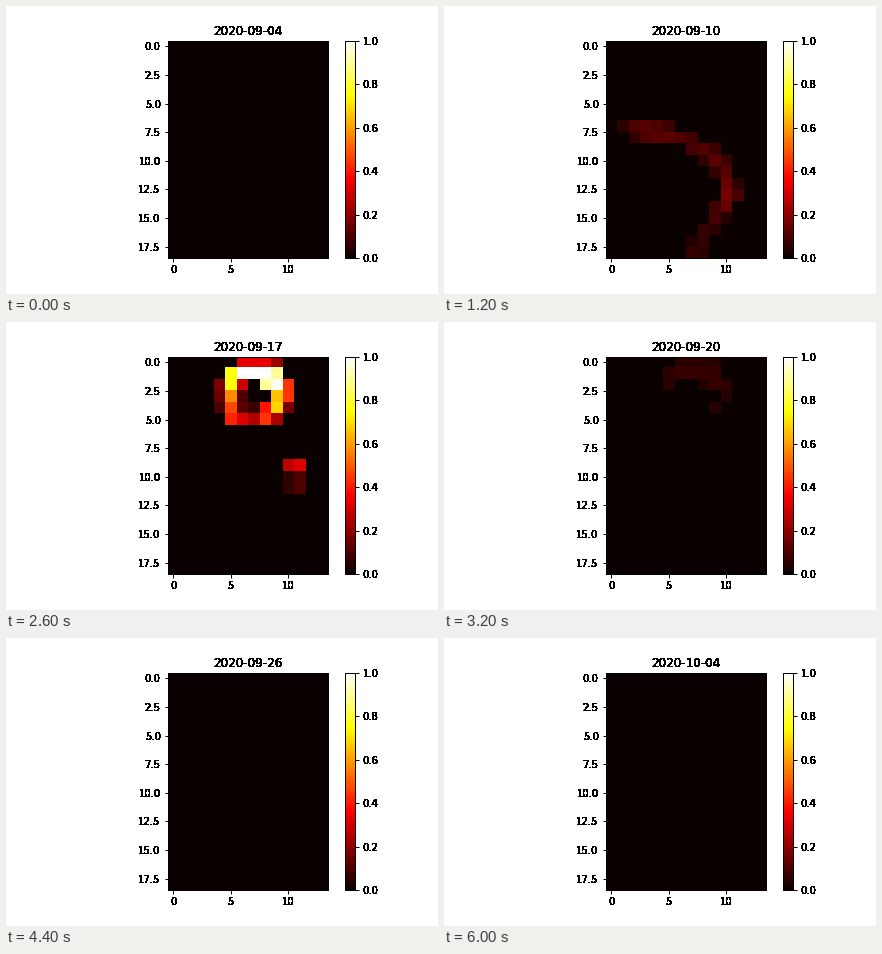
Write a matplotlib script that moves like this. It is 432 px wide and 288 px high and loops after 7000 ms.

```python
import matplotlib.pyplot as plt
import numpy as np
from matplotlib.animation import FuncAnimation

ROWS, COLS = 19, 14
LAST_DAY, STEPS, STEP_MS = 30, 35, 200
GROWTH, FADE, REACH = 0.05, 0.4, 4
THIN, BROAD = 0.4, 0.75

grid_r, grid_c = np.mgrid[:ROWS, :COLS]

# Peak day: fire fronts, each a width and key points (row, column, heat).
FIRES = {
    4: [(BROAD, [(7.6, 1.6, 0.25), (7.8, 3, 0.75), (8, 5, 0.75),
                 (8.5, 6.6, 0.5), (10, 8.9, 0.75), (11.5, 9.8, 0.7),
                 (13, 10, 1), (15, 8.6, 0.35), (17, 7.5, 0.45),
                 (18, 6.5, 0.25)]),
        (THIN, [(12, 2, 0.1)])],
    9: [(THIN, [(5, 5, 0.18), (5, 7, 0.32)]),
        (THIN, [(7, 0, 0.04), (7, 2, 0.11)]),
        (BROAD, [(9.2, 9.1, 0.47), (10.1, 10, 0.58)])],
    13: [(BROAD, [(4.9, 5.1, 0.4), (3, 4.95, 0.5), (1.6, 5, 0.75),
                  (0.9, 6, 1), (0.9, 8.5, 1), (2, 8.5, 1),
                  (2.2, 9.3, 0.8), (3, 9.4, 0.6), (4, 8.9, 0.68),
                  (4.8, 8, 0.38), (4.9, 6.8, 0.12), (4.9, 5.1, 0.4)]),
         (THIN, [(9, 10, 0.26), (9, 11, 0.32)]),
         (BROAD, [(10.5, 10, 0.06), (10.5, 11, 0.11)])],
    19: [(THIN, [(5, 7, 0.04), (5, 8, 0.1)]), (THIN, [(4, 12, 0.05)])],
    26: [(THIN, [(6, 6, 0.04), (6, 7, 0.1)])],
}


def front(points, width, age):
    """Heat around a line that grows with age and cools away from its peak."""
    points = np.array(points)
    middle = points[:, :2].mean(axis=0)
    points[:, :2] = middle + (points[:, :2] - middle) * (1 + GROWTH * age)
    points[:, 2] *= FADE ** abs(age)

    last = len(points) - 1
    t = np.linspace(0, last, 24 * last + 1)
    r, c, heat = (np.interp(t, range(last + 1), p) for p in points.T)
    dist2 = (grid_r[..., None] - r) ** 2 + (grid_c[..., None] - c) ** 2
    weight = np.minimum(1, 1.4 * np.exp(-dist2 / width ** 2))
    weight[weight < 0.17] = 0
    return (weight * heat).max(axis=2)


def heat_on(day):
    total = np.zeros((ROWS, COLS))
    for peak, fronts in FIRES.items():
        age = day - peak
        if abs(age) < REACH and 0 < day < LAST_DAY:
            for width, points in fronts:
                total = np.maximum(total, front(points, width, age))
    return np.where(total < 0.035, 0, total)


def date_on(day):
    month, d = (9, day + 4) if day <= 26 else (10, day - 26)
    return f"2020-{month:02d}-{d:02d}"


def solid(img, dpi):
    """Turn soft text edges into hard black ones."""
    img = img.copy()
    img[..., :3] = 0
    img[..., 3] = img[..., 3] > 0.04
    return img, 0, 0


plt.rcParams.update({
    "font.family": "DejaVu Sans",
    "axes.linewidth": 1,
    "xtick.major.width": 1,
    "ytick.major.width": 1,
})
fig, ax = plt.subplots(figsize=(6, 4), dpi=72)
fig.subplots_adjust(left=0.125, right=0.9, bottom=0.125, top=0.88)

image = ax.imshow(heat_on(0), cmap="hot", vmin=0, vmax=1)
bar = fig.colorbar(image, ax=ax)
ax.set_xticks([0, 5, 10])
ax.set_yticks(np.arange(0, 18, 2.5))
bar.set_ticks(np.linspace(0, 1, 6))
title = ax.set_title(date_on(0))
for text in [title, *ax.get_xticklabels(), *ax.get_yticklabels(),
             *bar.ax.get_yticklabels()]:
    text.set_agg_filter(solid)


def draw(i):
    day = min(i, LAST_DAY)
    image.set_data(heat_on(day))
    title.set_text(date_on(day))
    return image, title


anim = FuncAnimation(fig, draw, frames=STEPS, interval=STEP_MS,
                     init_func=lambda: draw(0), repeat=True, repeat_delay=0)
plt.show()
```
